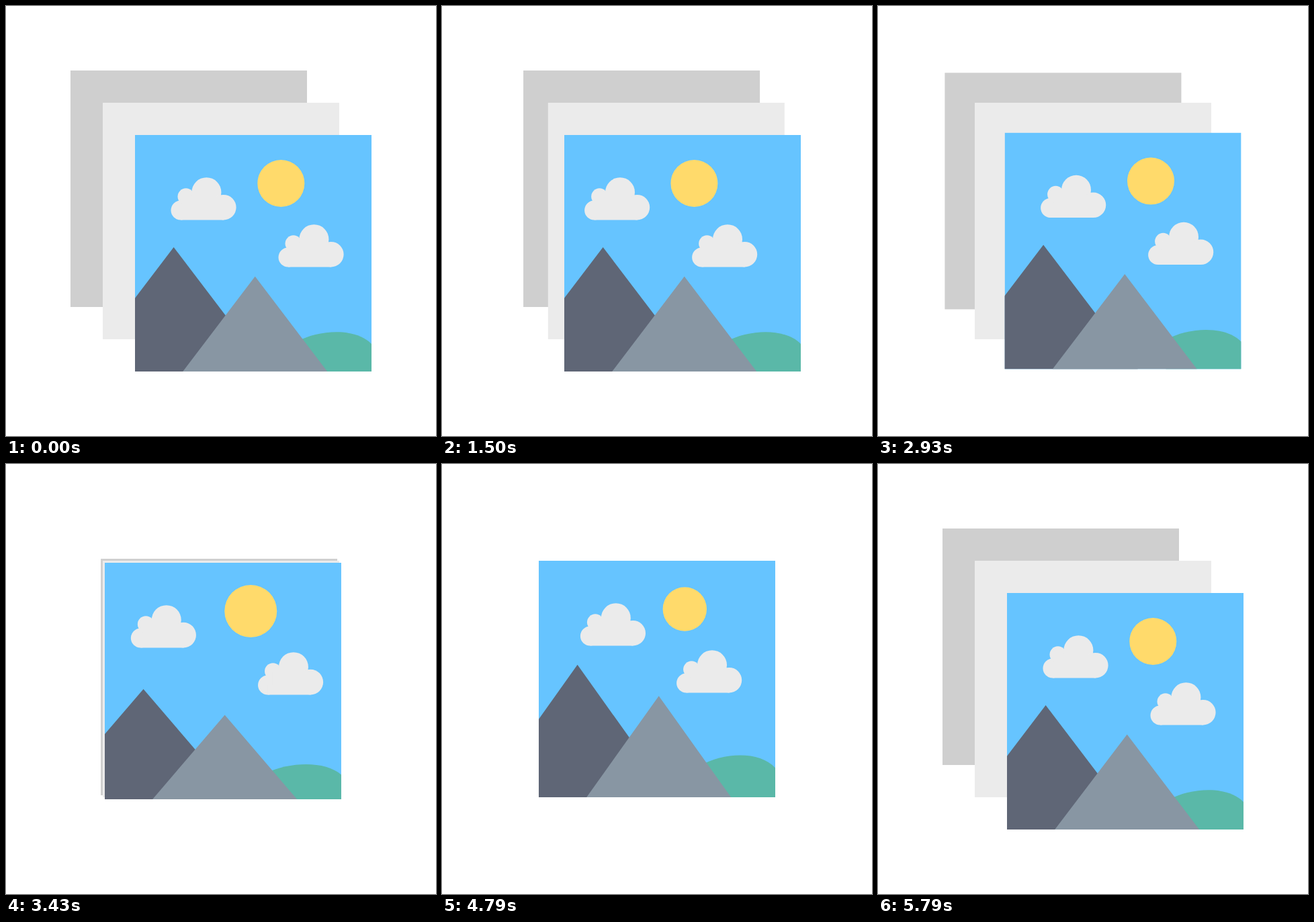
An HTML page that plays this animation: 640 px wide and 640 px high, repeating every 6 s.

```html
<!DOCTYPE html>
<html lang="en">
<head>
<meta charset="utf-8">
<title>Stacked pictures</title>
<style>
  html, body { margin: 0; width: 100%; height: 100%; overflow: hidden; background: #fff; }
  svg { display: block; width: 100%; height: 100%; }
</style>
</head>
<body>
<svg viewBox="0 0 640 640">
  <defs>
    <clipPath id="frame"><rect width="352" height="352"/></clipPath>
    <g id="cloud" fill="#ebebeb">
      <circle cx="68" cy="112" r="14.5"/>
      <circle cx="75.8" cy="91.6" r="12.3"/>
      <circle cx="106.4" cy="85.2" r="22"/>
      <circle cx="131.8" cy="107.7" r="18.8"/>
      <path d="M75 92H132V126.5H68V112H75Z"/>
    </g>
  </defs>
  <rect id="back" width="352" height="352" fill="#cfcfcf"/>
  <rect id="middle" width="352" height="352" fill="#ebebeb"/>
  <g id="front">
    <g clip-path="url(#frame)">
      <rect width="352" height="352" fill="#66c4ff"/>
      <circle id="sun" r="35" fill="#ffda6b"/>
      <use id="cloudA" href="#cloud"/>
      <use id="cloudB" href="#cloud"/>
      <g id="land">
        <path fill="#5ab8a8" d="M240 308C275 289 329 287 352 311V352H240Z"/>
        <path fill="#5f6676" d="M57.6 167L198.2 352H-83Z"/>
        <path fill="#8896a3" d="M178.7 210.5L286.2 352H71.2Z"/>
      </g>
    </g>
  </g>
</svg>
<script>
  const LOOP = 6000, STEP = LOOP / 84;
  const SPAN = 786, LAG = 212, REACH = 25.6;
  const parts = {};
  for (const id of ['back', 'middle', 'front', 'sun', 'cloudA', 'cloudB', 'land'])
    parts[id] = document.getElementById(id);

  // Quadratic ease-in-out from 0 to 1
  function ease(t, start, span = SPAN) {
    const x = Math.min(1, Math.max(0, (t - start) / span));
    return x < 0.5 ? 2 * x * x : 1 - 2 * (1 - x) ** 2;
  }

  // Left, right, then back to the centre
  function swing(t, lag) {
    const s = lag - 17;
    return REACH * (-ease(t, s) + 2 * ease(t, s + SPAN) - ease(t, s + 2 * SPAN));
  }

  function place(id, x, y, extra = '') {
    parts[id].setAttribute('transform', `translate(${x.toFixed(3)} ${y.toFixed(3)}) ${extra}`);
  }

  function draw(t) {
    const gap = 48 * (1 - ease(t, 2780) + ease(t, 4853));
    const puff = ease(t, 3007) - 1.33 * ease(t, 3793, 934) + 0.33 * ease(t, 4727, 1059);
    const drift = swing(t, 616);

    place('back', 144 - gap + swing(t, 0), 144 - gap);
    place('middle', 144 + swing(t, LAG), 144);
    place('front', 144 + gap + swing(t, 2 * LAG), 144 + gap);
    place('sun', 217.3 + swing(t, 630), 72, `scale(${1 + 0.2 * puff})`);
    place('cloudA', drift - REACH * puff, 0);
    place('cloudB', 160 + drift + REACH * puff, 70);
    place('land', 0, 352, `scale(1 ${1 - 0.2 * puff}) translate(0 -352)`);
  }

  const begin = performance.now();
  function tick() {
    const t = (performance.now() - begin) % LOOP;
    // Poses are held at 14 per second
    draw(Math.min(83, Math.floor((t + 8) / STEP)) * STEP);
    requestAnimationFrame(tick);
  }
  tick();
</script>
</body>
</html>
```
